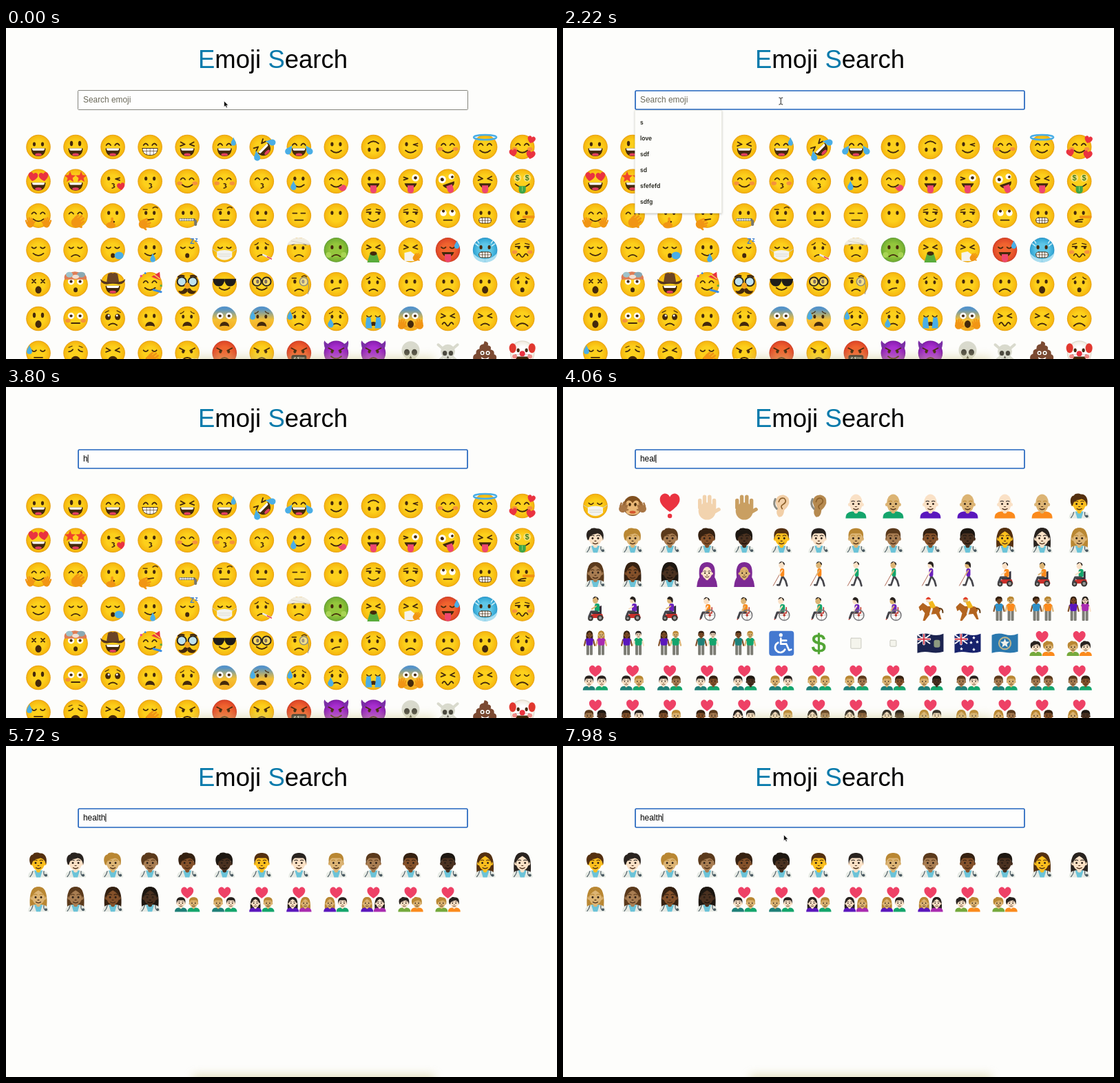
These frames come from a looping animation (800 by 480 pixels, 8000 ms). An HTML page:

```html
<!DOCTYPE html>
<html lang="en">
<head>
<meta charset="utf-8">
<title>Emoji Search</title>
<style>
html, body { margin: 0; width: 100%; height: 100%; overflow: hidden; background: #fdfdfb; }
svg { display: block; width: 800px; height: 480px; stroke-linecap: round; stroke-linejoin: round; }
text { font-family: "Liberation Sans", Arial, sans-serif; }
.menu text { font: 600 8.5px Inter, sans-serif; fill: #22221a; }
</style>
</head>
<body>
<svg id="stage" viewBox="0 0 800 480"></svg>
<script>
const LOOP = 8000;
const INK = '#44290c', BLUE = '#4aaee6', RED = '#ea3340', HAND = '#f19514';
const GREEN = '#14a56c', PURPLE = '#5a17bd', ORANGE = '#fb8a1c';

// Shape helpers, all in pixels around the centre of one emoji
const fill = (d, f = INK, s = 'none', w = 1) => `<path d="${d}" fill="${f}" stroke="${s}" stroke-width="${w}"/>`;
const line = (d, w = 1.8, s = INK) => fill(d, 'none', s, w);
const oval = (x, y, rx, ry = rx, f = INK) => `<ellipse cx="${x}" cy="${y}" rx="${rx}" ry="${ry}" fill="${f}"/>`;
const ring = (x, y, r, s = INK, w = 1.5, f = 'none') => `<circle cx="${x}" cy="${y}" r="${r}" fill="${f}" stroke="${s}" stroke-width="${w}"/>`;
const box = (x, y, w, h, f, r = 0) => `<rect x="${x}" y="${y}" width="${w}" height="${h}" rx="${r}" fill="${f}"/>`;
const group = (t, s) => `<g transform="${t}">${s}</g>`;
const at = (x, y, s, k = 1, r = 0) => group(`translate(${x} ${y}) rotate(${r}) scale(${k})`, s);
const both = s => s + group('scale(-1 1)', s);
const word = (x, y, s, size, f, more = '') => `<text x="${x}" y="${y}" font-size="${size}" fill="${f}" ${more}>${s}</text>`;

const heart = (c = RED) => fill('M0 5C-3 3-6 .5-6-2.5-6-5-4-6-2.8-6-1.5-6-.5-5 0-4 .5-5 1.5-6 2.8-6 4-6 6-5 6-2.5 6 .5 3 3 0 5z', c);
const drop = fill('M0-5C1-2 3 0 3 2A3 3 0 0 1-3 2C-3 0-1-2 0-5z', BLUE);
const star = (r, c) => fill('M' + [...Array(10).keys()].map(i => {
  const a = i * Math.PI / 5, q = i % 2 ? r * .45 : r;
  return (Math.sin(a) * q).toFixed(1) + ' ' + (-Math.cos(a) * q).toFixed(1);
}).join('L') + 'z', c);
const hand = (c = HAND) => line('M-4-1v-4M-1.4-2v-5M1.4-2v-5M4-1v-4M3 2l3.5-2', 2.1, c) + oval(0, 1, 4.8, 4.8, c);
const white = (x, y, r, dx = 0, dy = 0) => oval(x, y, r, r, '#fff') + oval(x + dx, y + dy, r * .45);
const coin = both(oval(-7, -5, 5.5, 5.5, '#f9e27a')) + [-7, 7].map(x => word(x, -1, '$', 11, '#3f7d20', 'text-anchor="middle" font-weight="bold"')).join('');

const eyes = {
  o: both(oval(-6, -4, 2.1, 2.9)),
  O: both(oval(-6, -5, 2.2, 3.7)),
  '^': both(line('M-9.5-2.5q3.2-5 6.4 0')),
  v: both(line('M-9.5-4q3.2 3.6 6.4 0')),
  '>': both(line('M-9.5-7l6 3.2-6.5 2.4')),
  x: both(line('M-9-7l5 5m0-5l-5 5')),
  '-': both(line('M-9-3.5h6')),
  h: both(at(-8, -6, heart(), 1.15, 10)),
  '*': both(at(-8, -6, star(8.5, '#f0442c'))),
  $: coin,
  w: oval(-6, -4, 2.1, 2.9) + line('M10-5l-6 1.5 6 2'),
  Y: line('M-10-6l6 2-6 2') + white(7, -5, 5.2),
  Z: white(-7, -5, 5.5) + white(7, -5, 4.2, 1, 1),
  W: both(white(-6.5, -4, 4.7)),
  r: both(white(-6.5, -4, 4.7, 0, -2.5)),
  s: line('M-10-5h6.5M3.5-5h6.5') + oval(-5, -3.2, 1.9) + oval(8, -3.2, 1.9) + line('M-10-8l6-1.5M4-9.5l6 1.5', 1.3),
  l: both(oval(-7, -2.5, 4, 4.5) + oval(-6, -4.5, 1.5, 1.5, '#fff') + line('M-11-9l5-2.5', 1.3)),
  K: both(oval(-6, -4, 2.1, 2.9)) + line('M-10-9h6M4-11q4-3 7 0', 1.4),
  B: both(oval(-6, -3, 2, 2.7) + line('M-10-7.5q3.5-.5 5-3', 1.3)),
  a: both(oval(-6, -2, 2, 2.5) + line('M-11-7l7 3.5')),
  c: both(line('M-10-2q4 0 6-3') + line('M-10-8l5-2', 1.2))
};

const mouths = {
  D: fill('M-10.5 2h21c0 7-4 11.5-10.5 11.5S-10.5 9-10.5 2z') + fill('M-9 2h18q0 3.2-2 3.2h-14q-2 0-2-3.2z', '#fff') + oval(0, 11, 4.8, 2, '#e2405f'),
  B: fill('M-11 2h22c0 7-4 10-11 10S-11 9-11 2z', '#fff', INK, .9) + line('M-10.5 6h21M-5 2v9M0 2v10M5 2v9', .6),
  s: line('M-7.5 5q7.5 6.5 15 0'),
  f: line('M-6 9.5q6-5 12 0'),
  F: line('M-8 10.5q8-7.5 16 0'),
  '-': line('M-6 6.5h12'),
  p: fill('M-9 3h18q-2 7-9 7t-9-7z') + fill('M-4.5 6h9v7a4.5 4.5 0 0 1-9 0z', '#ee476f'),
  o: oval(0, 8, 3, 3.5),
  O: oval(0, 8, 4.5, 5.4),
  k: line('M-1 3.5q5 0 2 3 4 2-2 3.5', 1.5),
  g: box(-9, 3, 18, 8, '#fff', 4) + line('M-9 7h18M-4 3v8M0 3v8M4 3v8', .7) + fill('M-5 3h10q4 0 4 4t-4 4h-10q-4 0-4-4t4-4z', 'none', INK, .9),
  w: line('M-8 8q2.7-5 5.3 0t5.3 0 5.3 0'),
  u: fill('M-7 11.5a7 7 0 0 1 14 0q-7-2.5-14 0z'),
  m: line('M-10 4q10 9 20 0') + fill('M-5 7h10v6a5 5 0 0 1-10 0z', '#3fa648') + line('M0 8v6', 1, '#9bd66f'),
  e: line('M-6 8.5q5-3.5 11-3')
};

const glasses = both(ring(-7, -4, 6.3, '#2b2620', 2, '#ffffff55')) + line('M-1-5h2', 2, '#2b2620');
const skull = oval(0, -4, 13, 13, '#d9dacd') + box(-7, 4, 14, 9, '#d9dacd', 3) + both(oval(-5.5, -1, 4, 4.5, '#4c4a40')) + fill('M0 4l2 4h-4z', '#4c4a40') + line('M-3 10v3M0 10v3M3 10v3', 1, '#77766a');

const extras = {
  d: at(13, -8, drop, 1.2),
  q: at(-13, -5, drop, 1.3),
  j: both(at(-14, 4, drop, 1.5, 35)),
  H: `<ellipse cy="-14" rx="16.5" ry="3.5" fill="none" stroke="${BLUE}" stroke-width="2.5"/>`,
  b: both(oval(-11, 3, 3.8, 2.7, '#f2774faa')),
  l: at(13, -10, heart(), .95, 15) + at(-13, 9, heart(), .95, -10) + at(12, 12, heart(), 1.1, 10),
  1: at(12, 8, heart(), .95, -10),
  t: at(-8, 6, drop, 1.4),
  y: fill('M2 9q6-1 7-4 6 0 6 5-2 5-8 4z', '#ee476f'),
  g: both(at(-12, 11, hand(), 1.1, -20)),
  c: at(2, 9, hand(), 1.5, 50),
  f: oval(0, 9, 3, 1.5) + line('M-1 15v-11', 3.4, HAND) + oval(-3, 14, 7, 4.5, HAND),
  i: at(-9, 12, hand(), 1.3, 70) + line('M-3 6l8-1'),
  z: line('M-10 6h20', 4, '#66665e') + `<path d="M-10 6h20" stroke="#ddd" stroke-width="3" stroke-dasharray=".5 3"/>` + box(10, 6, 4, 9, '#77776e', 2),
  L: line('M2 2h14', 4, HAND) + line('M-5 9h9'),
  2: oval(9, 8, 6.5, 5.5, BLUE),
  3: at(4, 11, drop, 1.3),
  4: word(4, -9, 'Z', 10, '#3d7fd0', 'font-weight="bold"') + word(11, -12, 'z', 9, '#3d7fd0', 'font-weight="bold"'),
  5: line('M-17-1L-9 4M17-1L9 4', 1, '#ccc') + fill('M-11 2q11-4 22 0v8q-11 9-22 0z', '#f3f3ee') + line('M-9 6h18M-8 9h16', .6, '#c9c9c0'),
  6: line('M2 7l12 6', 2.6, '#eee') + line('M8 10l6 3', 1.5, RED),
  7: fill('M-17-7q3-10 16-11 12 0 17 8l-1 3q-14-4-32 0z', '#f1ede0') + line('M-16-8l31 0M-11-13l26 5', .6, '#c9c2ad'),
  8: fill('M-5 5h10l4 13h-18z', '#59ac3c') + oval(0, 5, 5, 3),
  9: fill('M-9 4l9-2 9 7-4 7h-14z', '#f5f3ec') + at(8, 11, hand(), .9, 40),
  X: fill('M-16-7q-2-9 6-9 9-5 18 0 9 1 8 9z', '#df7d55') + oval(-9, -14, 5, 4, '#9fc3cb') + oval(8, -14, 6, 4, '#8aa9b3') + oval(0, -11, 5, 3, '#f1dfd2'),
  w: fill('M-18-8q3 5 18 5t18-5q0 7-9 8-9-2-18 0-9-1-9-8z', '#55351e') + fill('M-9-4l2-11q4-3 7-1 3-2 7 1l2 11q-9 3-18 0z', '#6b4425'),
  p: fill('M2-11l12-7 1 12z', RED) + line('M6-14l8 6', 1.5, '#f7d34a') + line('M5 8l11 3', 3, '#3b8de0') + oval(-13, -12, 1.6, 1.6, '#e8459a') + oval(-7, -16, 1.4, 1.4, '#3b8de0') + oval(16, 2, 1.6, 1.6, '#56b04a'),
  M: both(ring(-8, -4, 6.5, '#2b2620', 2, '#bfe2ee') + line('M-13-11q4-3 8-1', 2.5) + fill('M0 6q-4-2-6 2-3 3-7 1 2 6 7 5 5-1 6-4z')) + oval(0, 2, 4, 4.5, '#f4a51f'),
  S: both(fill('M-17-8h17v3q-2 8-8 8-8 0-9-11z', '#1f1d1a')),
  N: glasses,
  m: ring(7, -4, 6, '#8c8c80', 1.6, '#eef4ee88') + line('M13-2q3 8 0 16', .9, '#8c8c80'),
  e: both(fill('M-10-2h6q1 9 2 16h-9q-1-8 1-16z', BLUE)),
  h: both(at(-13, 9, hand(), 1.1, 15)),
  T: both(oval(-8, 11, 5, 3, '#eceee9') + oval(-13, 12, 5, 4, '#eceee9')),
  Z: box(-11, 3, 22, 9, '#2c2723', 3) + word(0, 11, '&amp;$!#', 8, '#fff', 'text-anchor="middle"'),
  C: both(fill('M-18 4q4 4 7 6 5 3 11 3v5q-16-1-18-14z', '#a9def0') + line('M-14-9l4 3M-11-13l2 3', 1.6, '#c9edf7')),
  G: both(oval(-11, 7, 4, 4, '#a9d455')),
  D: both(fill('M-16-6q-3-8-1-12 3 5 9 6z', '#7b2fa6')),
  k: skull,
  K: line('M-14 12l28-24M14 12l-28-24', 4, '#d9dacd') + at(0, 1, skull, .8),
  o: fill('M-1-17q7 1 5 6 6 1 4 6 6 1 5 7 5 1 3 8h-33q-2-7 4-9-1-6 5-7-1-6 6-7z', '#7b4a32') + both(white(-4, 0, 3)) + line('M-5 7q5 4 10 0', 1.5, '#fff'),
  n: both(oval(-14, -7, 5, 7, '#e1382f') + oval(-11, 5, 3.5, 3, '#f08b86')) + oval(0, 1, 4, 4, RED)
};

const skins = { G: 'G', R: 'R', C: 'C', P: 'P', V: 'V', n: 'n', k: '', K: '', o: '' };
const turns = { '(': -45, ')': 180, '[': -18 };

// A face is written as eye, mouth, then any extras
function face(code) {
  const [eye, mouth, ...more] = code;
  const skin = more.map(c => skins[c]).find(s => s !== undefined) ?? 'y';
  const body = skin && oval(0, 0, 17.8, 17.8, `url(#${skin})`);
  const turn = more.map(c => turns[c]).find(Boolean) || 0;
  return at(0, 0, body + (eyes[eye] || '') + (mouths[mouth] || '') + more.map(c => extras[c] || '').join(''), 1, turn);
}

// People: skin tone 0..5, kind p(erson) m(an) w(oman) b(ald)
const tone = ['#fbbf1e', '#fae1c6', '#dcb474', '#a87d52', '#84512a', '#4a3120'];
const hair = ['#543010', '#29231f', '#b98733', '#5b3a1c', '#352111', '#1d1711'];
const cuts = {
  p: 'M-11 0C-15-8-12-15-8-15-6-19 0-18 2-17 9-18 14-11 11 0 10-6 8-9 3-10-3-8-8-9-9.5-1z',
  m: 'M-10-1C-13-14-7-17.5 0-17.5S13-14 10-1Q10-8 6-10H-6Q-10-8-10-1z',
  w: 'M-9.5-1Q-9-8 0-13 9-8 9.5-1 13-18 0-18T-9.5-1z'
};
const coat = fill('M-15 18q0-9 9-10h12q9 1 9 10z', '#e6eae4') + fill('M-6 8h12l-3 10h-6z', '#6bc3d8') + line('M-8 9q-1 5-4 8M8 9q-1 6 3 7', 1.2, '#4a5a62') + oval(11, 15, 2, 2, '#4a5a62');

function bust(s, kind, shirt) {
  const c = tone[s], h = hair[s], mark = s === 5 ? '#1c110a' : '#4a2d18';
  const back = kind === 'w' ? fill('M-12 12C-14-10-9-18 0-18S14-10 12 12z', h) : '';
  const torso = shirt ? fill('M-15 18q0-9 9-10h12q9 1 9 10z', shirt) : coat;
  return back + torso + box(-3, 5, 6, 6, c, 3) + both(oval(-9.5, -2, 2, 2.6, c)) +
    oval(0, -4, 9.5, kind === 'b' ? 13 : 12, c) + (cuts[kind] ? fill(cuts[kind], h) : '') +
    both(oval(-4, -3, 1.4, 1.6, '#2d2017') + line('M-6.5-6.5q2.5-1.5 4.5 0', 1.1, h)) +
    line('M-1 1h2', 1.2, mark) + line('M-3.5 4q3.5 2.5 7 0', 1.3, mark);
}

const cloth = { m: ['#1f8078', GREEN], w: [PURPLE, '#a92bb0'], p: ['#75a93c', ORANGE] };
const pair = code => [[+code[0], code[1]], [+code[2], code[3]]];
const love = code => pair(code).map(([s, k], i) => at(i ? 9.2 : -9.2, 7.4, bust(s, k, cloth[k][i]), .6)).join('') +
  at(0, -8.8, heart('#ee4166'), 1.5);

function stander(s, k, shirt) {
  return box(-4.5, 1, 4, 16, '#7c7c74', 1) + box(.5, 1, 4, 16, '#7c7c74', 1) + line('M-5.5-5l-2 8M5.5-5l2 8', 2.2, tone[s]) +
    box(-5, -8, 10, 11, shirt, 3) + at(0, -11, bust(s, k, shirt), .4);
}
const hands = code => pair(code).map(([s, k], i) => at(i ? 8.5 : -8.5, 0,
  stander(s, k, k === 'p' ? ['#2f8fc6', ORANGE][i] : cloth[k][i]))).join('');

const head = (x, y, s, k) => oval(x, y, 4, 4.6, tone[s]) + fill(`M${x - 4} ${y - 2}q2-5 6-3 4 2 2 ${k === 'w' ? 9 : 5}l-3-5z`, hair[s ? 1 : 0]);
const shirts = { p: ORANGE, m: GREEN, w: '#6b22bb' };
const walker = (s, k) => line('M-3 0L-12 16', 1, '#b06a55') + line('M1 3l-4 12h-3M2 3l4 6 2 7', 2.7, '#45454b') +
  box(-2, -9, 6, 12, shirts[k], 3) + line('M1-6l-4 6', 1.8, tone[s]) + head(0, -13.5, s, k);
const motor = (s, k) => fill('M6-4l3-1v12h-14v-3h11z', '#34313a') + fill('M-9 9l6-2h13l2 6h-20z', '#c9302b') + ring(-7, 13.5, 2.8, '#3a3835', 2, '#999') + ring(7, 13, 3.4, '#3a3835', 2.2, '#999') +
  box(-1, -8, 7, 12, shirts[k], 3) + line('M2 4h-8l-3 7', 3.2, '#45454b') + line('M1-4l-6 4', 2, tone[s]) + head(0, -12.5, s, k);
const wheels = (s, k) => line('M7-2v8h-13l-4 9', 1.6, '#c0392f') + box(-2, -7, 7, 12, shirts[k], 3) + line('M2 5h-8l-3 8', 3, '#45454b') +
  ring(4, 9, 7.5, '#77777a', 1.6) + line('M4 2v14M-3 9h14', .6, '#999') + oval(4, 9, 1.8, 1.8, '#c0392f') + line('M1-4l-4 6', 2, tone[s]) + head(-1, -11.5, s, k);
const horse = s => fill('M-17-3l6-6 7 5h11q6 0 8 5l-2 4 3 10h-3l-5-8-9 1-7 9h-3l3-11-4-5-3 2z', '#b3641f') + line('M13-1q5 0 5 6', 2, '#623b14') +
  fill('M-3-10l6-2 5 9-7 3z', '#f2b71c') + line('M2 0l-2 7', 3, '#eee') + oval(-3, -13, 3.6, 3.6, tone[s]) + fill('M-7-14q4-7 8 0z', '#e33f2c');
const hijab = (s, c) => fill('M-15 18Q-14 8-11 4-14-18 0-18T11 4Q14 8 15 18z', c) + at(0, 0, bust(s, 'b', c), .75) + line('M-8-5Q-6-13 0-13T8-5', 3.5, c) + fill('M-9 8q9 5 18 0l5 10h-28z', c);

const flag = (c, inner) => fill('M-19-12q9-4 19-1t19-1v26q-9 3-19 1t-19 1z', c) + inner;
const jack = line('M-18-12l17 12M-18 0L-1-12', 2, '#fff') + line('M-9.5-13V1M-18-6h17', 3.5, '#fff') + line('M-9.5-13V1M-18-6h17', 1.7, '#d3293a');
const stars = [[-9, 8], [9, -8], [14, -2], [5, -1], [9, 9]].map(([x, y]) => at(x, y, star(2.6, '#fff'))).join('');

const range = n => [...Array(n).keys()];
const faces = `oD OD ^D ^B >D ^Dd >Dj( ^Dj os os) ws ^sb ^sH ^sbl
hD *D wk1 ok ^sb ^kb ^k ost ^sy op Yp Zp[ >p $m
^sg ^.c o.f K.i o.z K- o- -- o. ss sf r- og oeL
vs vf vo2 os3 vo4 v.5 Bf6 Bf7 ofG >.8 >.9 vpRd ogC swb
xO WoX oDw ^sp ..M .sS osN Kfm oe Bf of oF oO Bo
OO W-b lf ou Bu WuV BuVq Bfq Bft vue WOVh >w >f vF
v-q cu >u vuc aFT afR af a.RZ asPD afPD ..k ..K ..o oDn`.split(/\s+/).map(face);

const staff = [...'pmw'].flatMap(k => range(6).map(s => bust(s, k)));
const trio = make => [...'pmw'].flatMap(k => [make(1, k), make(2, k)]);
const monkey = oval(0, 0, 13.5, 14.5, '#80501f') + fill('M0-4q-4-6-8-3-4 4 0 8-6 12 8 12t8-12q4-4 0-8-4-3-8 3z', '#e9b777') +
  both(oval(-4, -2, 1.8, 2.4) + at(-14, 3, hand('#a87544'), 1.15, 20)) + oval(0, 9, 4.5, 2, '#d5562f');
const ear = c => fill('M-9-6Q-7-17 3-16 12-14 11-4 9 2 4 6 3 17-4 16-9 11-6 3z', c) + line('M-4-6q2-7 8-5 5 5-2 9-4 2-1 6', 1.7, '#8d612b') + line('M-9-10q-4 8 2 14', 3, '#8c8c83');
const heal = [
  face('v.5'), monkey,
  at(0, -3.5, heart(), 2.4) + oval(0, 14.5, 3.2, 3.2, RED),
  ...['#f2d3ae', '#c99f62'].map(c => at(0, 5, hand(c), 2.6)),
  ear('#f2cfa7'), ear('#b5894f'),
  ...[GREEN, PURPLE, ORANGE].flatMap(c => [1, 2].map(s => bust(s, 'b', c))),
  ...staff, hijab(1, '#7d2a94'), hijab(2, '#7d2a94'),
  ...trio(walker), ...trio(motor), ...trio(wheels), horse(1), horse(2),
  ...'4p2p 4p2p 4w1w 4w2w 4w1m 4w2m 4m1m 4m2m'.split(' ').map(hands),
  box(-18, -18, 36, 36, '#4479d0', 4) + oval(-1, -12, 2.6, 2.6, '#fff') + line('M-1-7v8h8l4 9 3-1M0-4h7M-5-1a7.5 7.5 0 1 0 10 10', 2.7, '#fff'),
  word(0, 13, '$', 37, '#52a535', 'text-anchor="middle" stroke="#52a535"'),
  ...[15, 9].map(n => `<rect x="${-n / 2}" y="${-n / 2}" width="${n}" height="${n}" rx="1" fill="#f4f4ec" stroke="#c8c8be"/>`),
  flag('#1c2450', jack + box(5, -5, 9, 11, '#8d9a80', 3)),
  flag('#17226c', jack + stars),
  flag('#2a78ae', ring(0, 0, 8.5, '#b9b38e', 2.2) + at(0, 0, star(7, '#eef0ea'))),
  love('1p2p'), love('2p1p'),
  ...range(18).map(i => love(`${1 + i / 5 | 0}m${1 + i % 5}m`)),
  ...range(10).map(i => love(`${1 + i / 5 | 0}w${1 + i % 5}m`))
];
const health = [...staff, ...'1m2m 2m1m 1w2m 1w2w 2w1m 2w1w 1p2p 2p1p'.split(' ').map(love)];

const grid = (id, list) => `<g id="${id}">${list.map((s, i) => at(47 + 54.05 * (i % 14), 172.5 + 49.8 * Math.floor(i / 14), s)).join('')}</g>`;
const radial = (id, a, b, c) => `<radialGradient id="${id}"><stop offset=".5" stop-color="${a}"/><stop offset=".9" stop-color="${b}"/><stop offset="1" stop-color="${c}"/></radialGradient>`;

const stage = document.getElementById('stage');
stage.innerHTML = `<defs>
  ${radial('y', '#fdd01c', '#f6b910', '#e49a10')}${radial('G', '#94c63c', '#76b032', '#5d9a35')}
  ${radial('R', '#f0642f', '#e04a28', '#c93a22')}${radial('C', '#5fc6e6', '#35a9d6', '#2890c4')}
  ${radial('P', '#a92fd0', '#8d20b4', '#74189a')}${radial('n', '#fff', '#f3eee4', '#d8d0c0')}
  <linearGradient id="V" x2="0" y2="1"><stop offset=".1" stop-color="#5593c8"/><stop offset=".55" stop-color="#f6c033"/><stop offset="1" stop-color="#f3ab1f"/></linearGradient>
  <filter id="soft" x="-20%" y="-200%" width="140%" height="500%"><feGaussianBlur stdDeviation="7"/></filter>
  <filter id="drop" x="-10%" y="-10%" width="120%" height="120%"><feDropShadow dx="0" dy="1" stdDeviation="1.5" flood-opacity=".25"/></filter>
</defs>
${box(0, 0, 800, 480, '#fdfdfb')}
<text x="387.5" y="58" font-size="36.5" text-anchor="middle"><tspan fill="#077aab">E</tspan>moji <tspan fill="#077aab">S</tspan>earch</text>
<rect id="field" fill="#fefefe"/>
<text id="typed" x="112" y="108" font-size="11.9"></text>
<path id="caret" stroke="#111" stroke-linecap="butt" d="M0 98v12"/>
${grid('faces', faces)}${grid('heal', heal)}${grid('health', health)}
<rect x="272" y="477" width="350" height="24" fill="#cfc88c" opacity=".55" filter="url(#soft)"/>
<g id="menu" class="menu"><rect x="104.5" y="119.5" width="126" height="149" fill="#fdfdfb" stroke="#e2e2d6" stroke-width=".6" filter="url(#drop)"/>
${['s', 'love', 'sdf', 'sd', 'sfefefd', 'sdfg'].map((s, i) => `<text x="112" y="${140 + i * 23}">${s}</text>`).join('')}</g>
<path id="beam" d="M-2.5-5Q0-5 0-3.5 0-5 2.5-5M0-3.5v7M-2.5 5Q0 5 0 3.5 0 5 2.5 5" fill="none" stroke="#222"/>
<path id="arrow" d="M0 0v8.5l2-1.7 1.4 3 1.5-.7-1.3-2.9h2.6z" fill="#111" stroke="#fff" stroke-width=".6"/>`;

const $ = id => document.getElementById(id);
const show = (id, on) => $(id).style.display = on ? '' : 'none';
const set = (id, attrs) => Object.entries(attrs).forEach(([k, v]) => $(id).setAttribute(k, v));
const move = (id, x, y) => set(id, { transform: `translate(${x} ${y})` });

const HOVER = 160, FOCUS = 300, BACK = 7300;
const keys = [[FOCUS, ''], [3780, 'h'], [3900, 'he'], [3960, 'hea'], [4040, 'heal'], [5400, 'healt'], [5520, 'health']];

function render(t) {
  const focus = t >= FOCUS;
  const [since, value] = keys.filter(k => k[0] <= t).pop() || [0, ''];
  set('field', focus
    ? { x: 105, y: 91, width: 565, height: 27, rx: 1.5, stroke: '#2264bd', 'stroke-width': 1.7 }
    : { x: 104.5, y: 90.5, width: 566, height: 28, rx: 1, stroke: '#85857e', 'stroke-width': 1 });
  $('typed').textContent = value || 'Search emoji';
  set('typed', { fill: value ? '#000' : '#6b695a' });
  show('caret', focus && Math.floor((t - since) / 500) % 2 === 0);
  move('caret', 112.5 + (value ? $('typed').getComputedTextLength() : 0), 0);

  show('menu', focus && !value);
  show('faces', t < 3900);
  show('heal', t >= 3900 && t < 5520);
  show('health', t >= 5520);

  // The pointer hides while typing and comes back below the field
  const p = Math.min(1, Math.max(0, (t - BACK) / 400));
  const k = p * p * (3 - 2 * p);
  const y = 106 + 23 * k;
  const inField = y < 119;
  show('beam', inField && (t >= HOVER && !value || t >= BACK));
  show('arrow', t < HOVER || t >= BACK && !inField);
  move('beam', 316.3, y);
  move('arrow', 316.5 + 4 * k, y);
}

let start;
function tick(now) {
  start ??= now;
  render((now - start) % LOOP);
  requestAnimationFrame(tick);
}
render(0);
requestAnimationFrame(tick);
</script>
</body>
</html>
```
